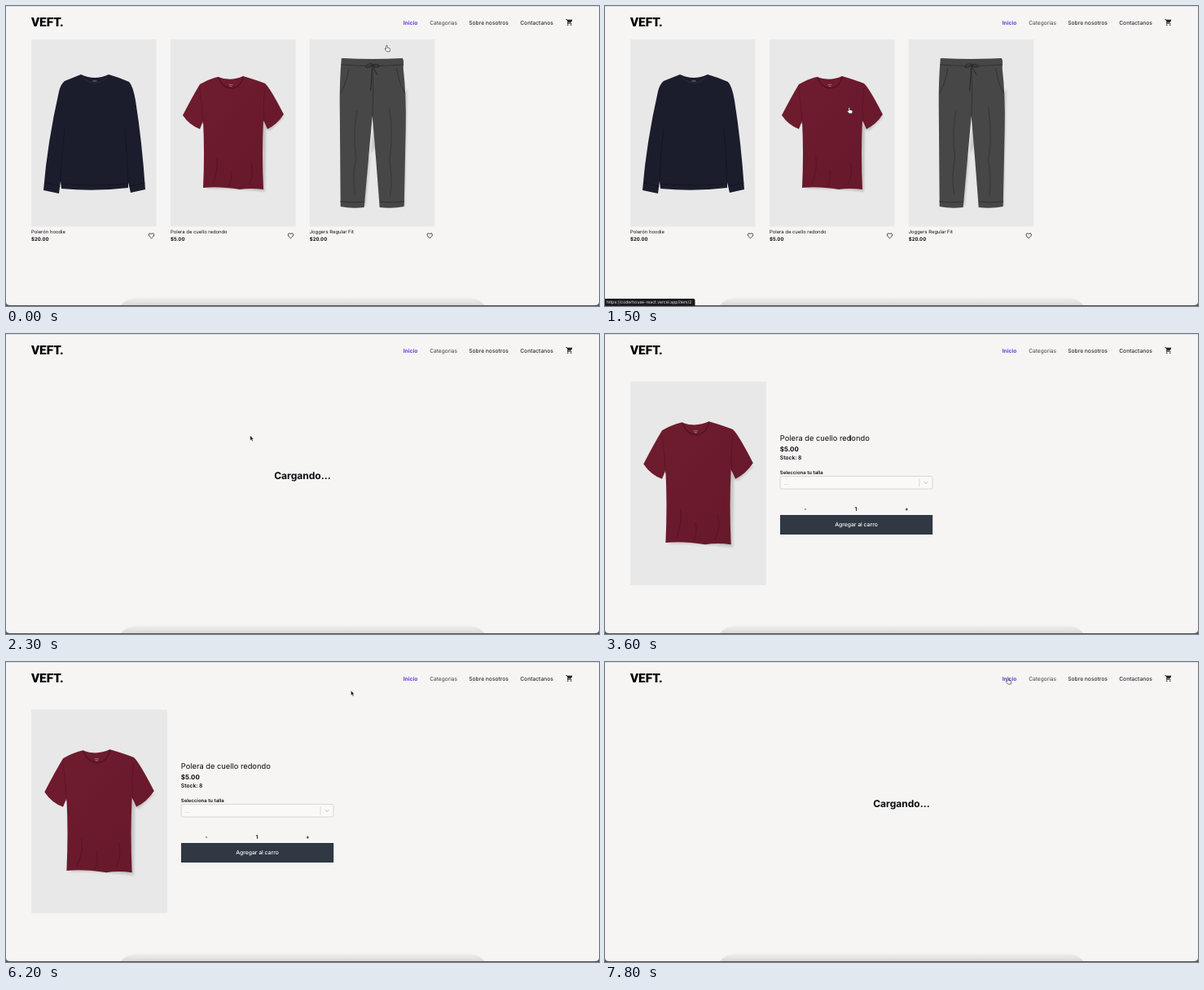
Recreate the animation shown at these times as an HTML page. Size 728 by 368 pixels, loop 8000 ms.

```html
<!DOCTYPE html>
<html lang="es">
<head>
<meta charset="utf-8">
<title>Tienda</title>
<style>
  html, body { margin: 0; width: 100%; height: 100%; overflow: hidden; background: #f6f5f4; }
  svg { display: block; width: 728px; height: 368px; }
  text { font-family: Inter, sans-serif; fill: #0c0c10; text-rendering: geometricPrecision; }
  .logo { font: 800 15.3px Roboto, sans-serif; fill: #000; }
  .nav { font-size: 6.7px; font-weight: 500; fill: #24242c; }
  .nav text { fill: #2c2c34; }
  .nav .on { font-weight: 700; fill: #6d3cd6; }
  .nav .thin { font-weight: 400; font-size: 6.6px; fill: #3c3c44; }
  .name { font-size: 5.9px; }
  .price { font-size: 6px; font-weight: 700; }
  .mid { text-anchor: middle; }
  .photo { fill: #e8e8e8; }
  .heart { fill: none; stroke: #1c1c20; stroke-width: .85; stroke-linejoin: round; }
  .fold { fill: none; stroke-linecap: round; }
  .hand { fill: #fff; stroke: #2a2a2e; stroke-width: .65; stroke-linejoin: round; }
</style>
</head>
<body>
<svg viewBox="0 0 728 368">
  <defs>
    <linearGradient id="dock" x2="0" y2="1">
      <stop offset="0" stop-color="#efeeed"/>
      <stop offset="1" stop-color="#d9d8d7"/>
    </linearGradient>
    <linearGradient id="cloth" x2="1" y2="1">
      <stop offset="0" stop-color="#701c2f"/>
      <stop offset="1" stop-color="#66182a"/>
    </linearGradient>
    <filter id="soft"><feGaussianBlur stdDeviation="1.3"/></filter>
    <path id="heart" class="heart" d="M0 3.1C-1.4 1.8-3.2.5-3.2-1.1C-3.2-3.3-.8-3.5 0-1.9C.8-3.5 3.2-3.3 3.2-1.1C3.2.5 1.4 1.8 0 3.1Z"/>

    <g id="sweater">
      <path d="M61 43Q78 51 95 43Q109 47 120 52Q125 57 128 75Q136 125 140 184L122 188L119 175L119 182Q78 187 37 183L36 174L34 189L15 185Q20 125 34 64Q36 55 41 51Q51 47 61 43Z" fill="#1b1d2c"/>
      <path class="fold" d="M62.500 46Q78 61 93.500 46" stroke="#313445" stroke-width=".7"/>
      <path class="fold" d="M41 110Q37 145 36 174M115 110Q118 145 119 175M37 177Q78 181 119 177M17 176L35 180M121 180L139 176" stroke="#11131f" stroke-width=".8"/>
      <path d="M75.500 50h5v2h-5z" fill="#4a4d5c"/>
    </g>

    <g id="tee">
      <path d="M42 107L45 183Q85 183 116 187L117 110L122 112L140 95" fill="#c4c3c3" filter="url(#soft)"/>
      <path d="M58 46Q74 52 89 45Q106 50 116 54Q122 59 139 92Q131 104 119 110L114 99Q112 140 114 184Q98 182 85 184Q60 180 40 182Q42 140 40 100L36 110Q23 105 15 93Q28 68 36 55Q46 49 58 46Z" fill="url(#cloth)"/>
      <path class="fold" d="M59 46.500Q63 59 75 60Q86 59 89 46" stroke="#4e1020" stroke-width="1.1"/>
      <path class="fold" d="M36 60Q39 82 40 103M116 60Q113 82 115 101" stroke="#581424" stroke-width=".8"/>
      <path class="fold" d="M52 177Q59 160 57 145M96 178Q103 164 99 151M72 180Q76 170 74 160" stroke="#5b1425" stroke-width="1.2"/>
      <path d="M71.500 55h5v1h-5zM72.500 57h3v1h-3z" fill="#a66b75"/>
    </g>

    <g id="joggers">
      <path d="M40 204h29L78 105L88 204h29L120 60" fill="#c8c7c7" filter="url(#soft)"/>
      <path d="M39 25Q38 23 41 23Q77 25 114 23Q116 24 115 35Q119 70 118 110L116 205Q101 208 86 206Q82 150 77 94Q72 150 67 206Q52 208 38 205L37 75Q37 48 39 25Z" fill="#474747"/>
      <path class="fold" d="M39 31Q77 34 115 31M77 33Q79 62 77 94M38 66Q45 55 48 36M117 66Q110 55 107 36M38 199Q53 201 67 199M87 199Q102 201 116 199" stroke="#303030" stroke-width=".9"/>
      <path class="fold" d="M58 88Q53 116 57 145Q52 170 56 190M98 84Q103 120 98 148Q102 170 99 192" stroke="#3b3b3b" stroke-width="1.4"/>
      <path class="fold" d="M77 30Q70 29 69 34Q73 36 77 31Q84 29 86 33Q82 36 78 31Q79 38 83 43M77 32L75 63" stroke="#252525" stroke-width="1"/>
    </g>
  </defs>

  <rect width="728" height="368" fill="#f6f5f4"/>
  <rect width="728" height="1" fill="#dddcdb"/>
  <path d="M140 368Q148 358 161 358H570Q582 359 588 368Z" fill="url(#dock)"/>
  <path d="M0 363Q0 367 5 367H723Q728 367 728 363V368H0Z" fill="#55555a"/>

  <text class="logo" x="31" y="25.400">VEFT.</text>
  <g class="nav">
    <text class="on" x="487.700" y="22.900">Inicio</text>
    <text class="thin" x="520.200" y="22.900">Categorias</text>
    <text x="568.200" y="22.900">Sobre nosotros</text>
    <text x="631.200" y="22.900">Contactanos</text>
  </g>
  <path transform="translate(686.900 15.200) scale(.4)" fill="#26262e" d="M7 18a2 2 0 1 0 0 4a2 2 0 1 0 0-4ZM17 18a2 2 0 1 0 0 4a2 2 0 1 0 0-4ZM1 2V4H3L6.600 11.600L5.200 14C4.500 15.300 5.500 17 7 17H19V15H7.400L8.100 13H15.600Q16.800 13 17.300 12L20.900 5.500Q21.400 4 20 4H5.200L4.300 2Z"/>

  <g id="list"></g>

  <g id="loading">
    <text class="mid" x="364" y="178.300" font-size="12.050" font-weight="700">Cargando...</text>
  </g>

  <g id="detail">
    <rect class="photo" x="31" y="58.500" width="167" height="249.500" fill="#e5e5e5"/>
    <use href="#tee" transform="translate(31 58.500) scale(1.085)"/>
    <text x="214.800" y="131" font-size="9.300">Polera de cuello redondo</text>
    <text x="214.800" y="143.500" font-size="7.900" font-weight="700">$5.00</text>
    <text x="214.800" y="154.200" font-size="6.700" font-weight="600">Stock: 8</text>
    <text x="214.800" y="172" font-size="6" font-weight="600">Selecciona tu talla</text>
    <rect x="215" y="174.500" width="187" height="15.500" rx="2" fill="#faf9f8" stroke="#cfcfcf" stroke-width=".8"/>
    <text x="219.800" y="184.700" font-size="6.500" style="fill:#808080">...</text>
    <path d="M386 177.500V187" stroke="#ccc" stroke-width=".7"/>
    <path d="M391.700 181.300L394 183.600L396.300 181.300" fill="none" stroke="#bcbcbc" stroke-width="1"/>
    <g class="mid" font-size="6.700" font-weight="600">
      <text x="246" y="217.200">-</text>
      <text x="308" y="217.200">1</text>
      <text x="370.300" y="217.200">+</text>
    </g>
    <rect x="215" y="222" width="187.200" height="24" fill="#2f3843"/>
    <text class="mid" x="308.500" y="236.400" font-size="6.800" font-weight="500" style="fill:#fff">Agregar al carro</text>
  </g>

  <g id="status">
    <path id="chip" fill="#1b1b1f"/>
    <text id="url" x="2" y="365.200" font-size="5.100" style="fill:#e6e6e8"></text>
  </g>

  <g id="cursor">
    <path id="arrow" d="M0 0V6L1.400 4.800L2.400 7L3.400 6.500L2.400 4.400H4.100Z" fill="#111" stroke="#fff" stroke-width=".35"/>
    <path id="hand" class="hand" d="M-.8 .7A.8 .8 0 0 1 .8 .7V2.900L3.400 3.400Q4.300 3.700 4.100 4.700L3.500 7.300H0L-2.300 4.600Q-2.500 3.400-1.400 3.600L-.8 4.200Z"/>
    <path id="beam" d="M.3 0Q1.200 0 1.200 .8V5.200Q1.200 6 .3 6M2.100 0Q1.200 0 1.200 .8V5.200Q1.200 6 2.100 6M.6 3.700H1.800" fill="none" stroke="#111" stroke-width=".7"/>
  </g>
</svg>
<script>
  const LOOP = 8000, STEP = 100;
  const SITE = 'https://coderhouse-react.vercel.app';
  const $ = id => document.getElementById(id);
  const show = (id, on) => $(id).setAttribute('visibility', on ? 'visible' : 'hidden');

  const products = [
    ['sweater', 31, 'Polerón hoodie', '$20.00'],
    ['tee', 202, 'Polera de cuello redondo', '$5.00'],
    ['joggers', 372.7, 'Joggers Regular Fit', '$20.00']
  ];
  $('list').innerHTML = products.map(([art, x, name, price]) => `
    <g transform="translate(${x} 41)">
      <rect class="photo" width="153.700" height="229.500"/>
      <use href="#${art}"/>
      <text class="name" y="238.200">${name}</text>
      <text class="price" y="246.800">${price}</text>
      <use href="#heart" x="147.500" y="240.800"/>
    </g>`).join('');

  // Pointer stops: time, x, y
  const path = [
    [0, 467.5, 48.5], [900, 299.8, 124.6], [5600, 299.8, 124.6],
    [6000, 421.5, 36.5], [6100, 421.5, 36.5], [6200, 423.5, 35],
    [7000, 493.5, 17.5], [7200, 494.7, 19.8]
  ];

  function pointer(t) {
    const i = path.findIndex(p => p[0] > t);
    if (i < 0) return path[path.length - 1].slice(1);
    const [t0, x0, y0] = path[i - 1], [t1, x1, y1] = path[i];
    const u = (t - t0) / (t1 - t0), e = u * u * (3 - 2 * u);
    return [x0 + (x1 - x0) * e, y0 + (y1 - y0) * e];
  }

  function pageAt(t) {
    if (t < 1600) return 'list';
    if (t < 3600 || t >= 7500) return 'loading';
    return 'detail';
  }

  function cursorAt(t, x, page) {
    if (page === 'list') return x > 356 && x < 372 ? 'arrow' : 'hand';
    if (page === 'detail' && t < 5700) return 'beam';
    return t > 6200 && x > 486 ? 'hand' : 'arrow';
  }

  // Opacity, address tail and width of the link hint
  function statusAt(t, x) {
    if (t < 2000) return [t < 1900 ? (x < 356 ? 1 : 0) : .5, '/item/2', 110.5];
    if (t >= 7000 && t < 7800) return [t < 7700 ? 1 : .5, '', 94];
    return [0, '', 94];
  }

  function draw(now) {
    const t = Math.floor(now % LOOP / STEP) * STEP;
    const [x, y] = pointer(t), page = pageAt(t), kind = cursorAt(t, x, page);
    for (const id of ['list', 'loading', 'detail']) show(id, id === page);
    for (const id of ['arrow', 'hand', 'beam']) show(id, id === kind);
    $('cursor').setAttribute('transform', `translate(${x} ${y})`);

    const [alpha, tail, width] = statusAt(t, x);
    $('status').setAttribute('opacity', alpha);
    $('url').textContent = SITE + tail;
    $('chip').setAttribute('d', `M0 359H${width - 2}Q${width} 359 ${width} 361V368H0Z`);
  }

  let start;
  function tick(now) {
    start ??= now;
    draw(now - start);
    requestAnimationFrame(tick);
  }
  draw(0);
  requestAnimationFrame(tick);
</script>
</body>
</html>
```
